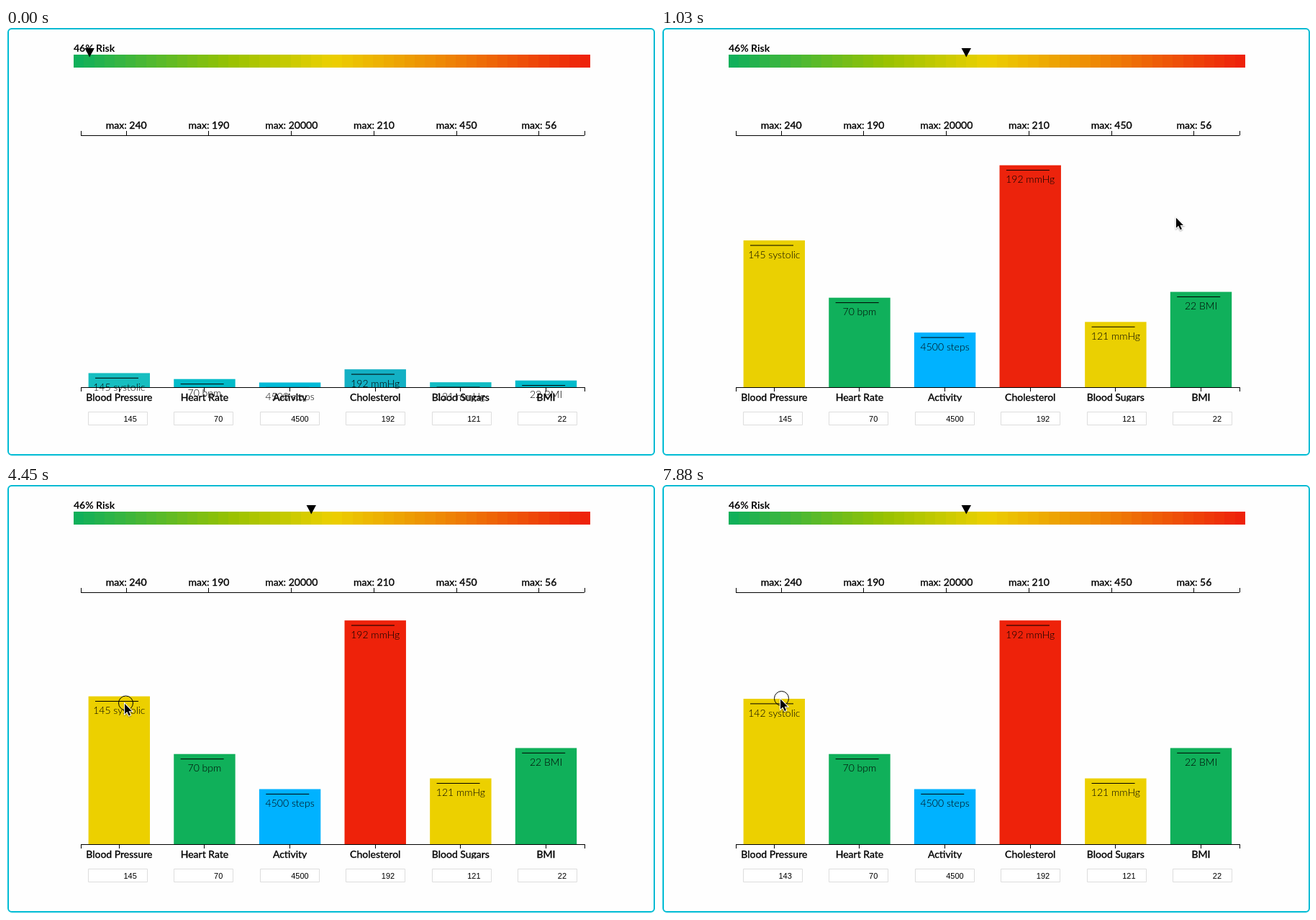
Write an HTML page with a canvas that moves like this. It is 902 px wide and 596 px high and loops after 8000 ms.

```html
<!DOCTYPE html>
<html lang="en">
<head>
<meta charset="utf-8">
<title>Health risk chart</title>
<style>
  html, body { margin: 0; width: 100%; height: 100%; overflow: hidden; background: #fff; }
  canvas { display: block; }
</style>
</head>
<body>
<canvas id="stage" width="902" height="596"></canvas>
<script>
const ctx = document.getElementById('stage').getContext('2d');
const LOOP = 8000, BASE = 499, RANGE = 340, TOP_AXIS = 149;
const AXIS_L = 104, AXIS_R = 804;
const BAR_X = 114.6, BAR_W = 85.42, BAR_STEP = 118.64;
const METER = { x: 94, y: 37, w: 718, h: 18, cells: 50 };

const START = [0, 188, 212];
const YELLOW = [236, 208, 0], GREEN = [16, 176, 90], BLUE = [0, 178, 255], RED = [238, 34, 10];
const METER_STOPS = [[0, ...GREEN], [0.3, 152, 194, 0], [0.5, ...YELLOW], [0.75, 238, 125, 5], [1, ...RED]];

const bars = [
  { name: 'Blood Pressure', value: 145, max: 240, unit: 'systolic', color: YELLOW },
  { name: 'Heart Rate', value: 70, max: 190, unit: 'bpm', color: GREEN },
  { name: 'Activity', value: 4500, max: 20000, unit: 'steps', color: BLUE },
  { name: 'Cholesterol', value: 192, max: 210, unit: 'mmHg', color: RED },
  { name: 'Blood Sugars', value: 121, max: 450, unit: 'mmHg', color: YELLOW },
  { name: 'BMI', value: 22, max: 56, unit: 'BMI', color: GREEN }
];

// time, x, y of the pointer tip
const POINTER = [
  [880, 831, 235], [1030, 714.5, 264], [1470, 420, 318], [1910, 230, 345.5],
  [2350, 188, 337], [3100, 165, 304], [4450, 165, 304], [4750, 165, 302.5],
  [5200, 165, 302.5], [6250, 166, 285.5], [6550, 166, 279], [6700, 166, 279.5],
  [7280, 166, 294.5], [7430, 166, 294.5], [7880, 166, 297.5]
];
const POINTER_IN = 875, PRESS = 3395, DRAG = 4590, RISK_UP = 6125, RISK_DOWN = 6980;

// The picture holds still between beats: [section start, beat length]
const BEATS = [[0, 146.88], [2350, 150], [6400, 146.67], [7280, 150]];

const clamp = (v, a, b) => Math.min(b, Math.max(a, v));
const mix = (a, b, k) => a + (b - a) * k;
const rgb = c => `rgb(${c.map(v => Math.round(clamp(v, 0, 255))).join(',')})`;

function onBeat(t) {
  const [from, len] = BEATS.filter(b => b[0] <= t).pop();
  return from + Math.floor((t - from + 8) / len) * len;
}

function track(keys, t) {
  if (t <= keys[0][0]) return keys[0].slice(1);
  for (let i = 1; i < keys.length; i++) {
    const a = keys[i - 1], b = keys[i];
    if (t <= b[0]) {
      const k = (t - a[0]) / (b[0] - a[0]);
      return a.slice(1).map((v, j) => mix(v, b[j + 1], k));
    }
  }
  return keys[keys.length - 1].slice(1);
}

function elastic(u) {
  return u >= 1 ? 1 : 1 - 2 ** (-10 * u) * Math.cos(2 * Math.PI * u / 0.45);
}

function cubicInOut(u) {
  u = clamp(u, 0, 1);
  return u < 0.5 ? 4 * u ** 3 : 1 - 4 * (1 - u) ** 3;
}

function box(x, y, w, h, color) {
  ctx.fillStyle = color;
  ctx.fillRect(x, y, w, h);
}

function text(str, x, y, font, align = 'center', heavy = 0) {
  ctx.font = font;
  ctx.textAlign = align;
  ctx.fillStyle = ctx.strokeStyle = '#000';
  ctx.fillText(str, x, y);
  if (heavy) {
    ctx.lineWidth = heavy;
    ctx.strokeText(str, x, y);
  }
}

const lato = weight => `${weight} 14px Lato, sans-serif`;

function axis(y, dir, ticks) {
  box(AXIS_L, y, AXIS_R - AXIS_L, 1, '#000');
  for (const x of [AXIS_L - 0.5, ...ticks, AXIS_R - 0.5]) {
    box(Math.round(x), dir < 0 ? y - 6 : y, 1, 6, '#000');
  }
}

function drawFrame() {
  ctx.strokeStyle = '#00bcd4';
  ctx.fillStyle = '#fefefe';
  ctx.lineWidth = 2;
  ctx.beginPath();
  ctx.roundRect(3, 1, 898, 592, 5);
  ctx.fill();
  ctx.stroke();
}

function drawMeter(t) {
  const { x, y, w, h, cells } = METER;
  for (let i = 0; i < cells; i++) {
    const a = Math.round(x + w * i / cells), b = Math.round(x + w * (i + 1) / cells);
    box(a, y, b - a, h, rgb(track(METER_STOPS, i / (cells - 1))));
  }
  const high = t >= RISK_UP && t < RISK_DOWN;
  text(`${high ? 47 : 46}% Risk`, x, 33, lato(700), 'left');

  const risk = 0.46 * cubicInOut((t + 64) / 250)
    + 0.01 * (cubicInOut((t - RISK_UP) / 250) - cubicInOut((t - RISK_DOWN) / 250));
  const mx = x + w * risk;
  ctx.fillStyle = '#000';
  ctx.beginPath();
  ctx.moveTo(mx - 6.7, 28);
  ctx.lineTo(mx + 6.7, 28);
  ctx.lineTo(mx, 40.5);
  ctx.fill();
}

function drawChart(t, tipY) {
  const maxX = i => 167.2 + 114.75 * i;
  const midX = i => BAR_X + BAR_STEP * i + BAR_W / 2;

  ctx.save();
  ctx.beginPath();
  ctx.rect(0, 0, 902, 519);
  ctx.clip();

  axis(TOP_AXIS, -1, bars.map((b, i) => maxX(i) - 0.5));
  bars.forEach((b, i) => text(`max: ${b.max}`, maxX(i), 140, lato(400), 'center', 0.35));
  axis(BASE, 1, bars.map((b, i) => midX(i) - 0.5));
  bars.forEach((b, i) => text(b.name, midX(i), 518, lato(400), 'center', 0.35));

  bars.forEach((b, i) => {
    const e = elastic((t + 24 - 1.2 * i) / 1950);
    const dragged = i === 0 && t >= DRAG;
    const value = dragged ? (BASE - tipY + 0.5) * b.max / RANGE : b.value;
    const h = value / b.max * RANGE * e;
    const x = BAR_X + BAR_STEP * i, top = BASE - h;
    box(x, top, BAR_W, h, rgb(START.map((c, j) => mix(c, b.color[j], e))));
    box(x + 9.4, top + 6.4, 60, 1, '#000');
    text(`${Math.floor(value)} ${b.unit}`, midX(i), top + 24.7, lato(300));
    b.shown = Math.round(value);
  });
  ctx.restore();
}

function drawInputs() {
  bars.forEach((b, i) => {
    const x = 114 + 119.45 * i;
    ctx.fillStyle = '#fff';
    ctx.strokeStyle = '#ddd';
    ctx.lineWidth = 1;
    ctx.beginPath();
    ctx.rect(Math.round(x) + 0.5, 533.5, 82, 18);
    ctx.fill();
    ctx.stroke();
    text(b.shown, x + 67.8, 547, '11px "Liberation Sans", Arial, sans-serif', 'right');
  });
}

function drawPointer(x, y, pressed) {
  if (pressed) {
    ctx.strokeStyle = '#000';
    ctx.lineWidth = 1;
    ctx.beginPath();
    ctx.arc(x + 1.5, y - 1, 10, 0, 2 * Math.PI);
    ctx.stroke();
  }
  const arrow = new Path2D(`M${x} ${y}v14l3.3-3 2.5 5.5 2.2-1-2.4-5.2h4.4z`);
  ctx.save();
  ctx.shadowColor = 'rgba(0,0,0,.35)';
  ctx.shadowBlur = 2;
  ctx.shadowOffsetY = 1;
  ctx.strokeStyle = '#fff';
  ctx.lineWidth = 2;
  ctx.stroke(arrow);
  ctx.restore();
  ctx.fillStyle = '#000';
  ctx.fill(arrow);
}

function draw(now) {
  const t = onBeat(now % LOOP);
  const [px, py] = track(POINTER, t);
  ctx.clearRect(0, 0, 902, 596);
  drawFrame();
  drawMeter(t);
  drawChart(t, py);
  drawInputs();
  if (t >= POINTER_IN) drawPointer(px, py, t >= PRESS);
}

let begin = null;
function tick(now) {
  if (begin === null) begin = now;
  draw(now - begin);
  requestAnimationFrame(tick);
}
requestAnimationFrame(tick);
</script>
</body>
</html>
```
